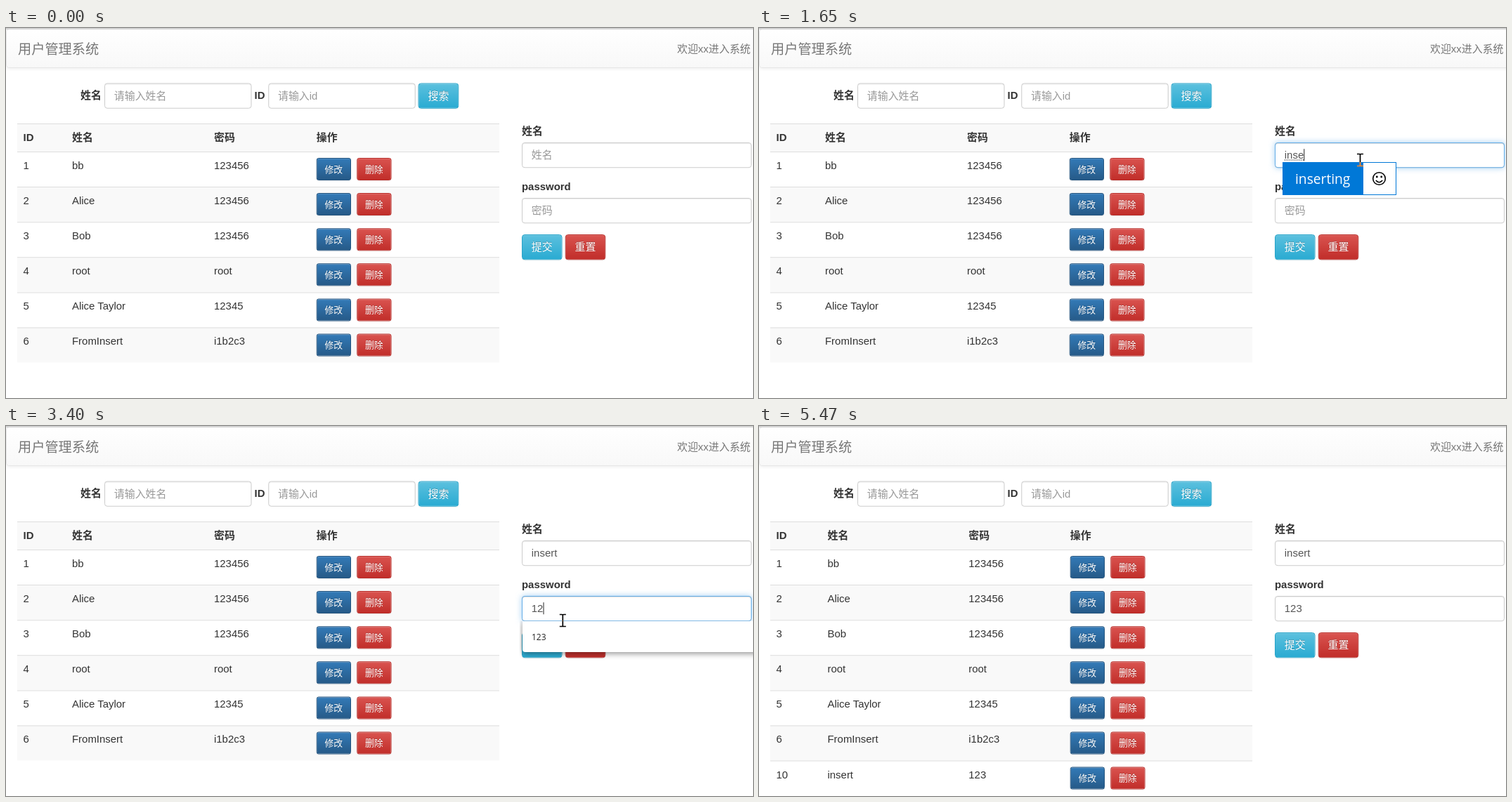
Animation, 1063 px wide and 527 px high, one loop 5560 ms. Source, as an HTML page:

```html
<!DOCTYPE html>
<html lang="zh">
<head>
<meta charset="utf-8">
<style>
html, body { margin: 0; width: 100%; height: 100%; overflow: hidden; background: #fff; }
/* zoom and scale cancel out: edges may lie between whole pixels */
#stage { position: absolute; left: 0; top: 0; width: 1063px; height: 527px; zoom: 4; transform: scale(.25); transform-origin: 0 0;
  overflow: hidden; background: #fff;
  font: 14.93px/0 "Liberation Sans", Arial, "Noto Sans CJK SC", "Noto Sans CJK", sans-serif; color: #333; }
#stage div { position: absolute; box-sizing: border-box; white-space: pre; }
#stage .b { font-weight: bold; }
.nav { border: 1px solid #e7e7e7; border-radius: 4px; background: linear-gradient(#fff, #f8f8f8);
  box-shadow: inset 0 1px 0 rgba(255,255,255,.15), 0 1px 5px rgba(0,0,0,.075); }
.line { background: #ddd; }
.stripe { background: #f9f9f9; }
.input { border: 1px solid #ccc; border-radius: 4px; background: #fff; box-shadow: inset 0 1px 1px rgba(0,0,0,.075); }
.glow { border: 1px solid #66afe9; border-radius: 4px; box-shadow: inset 0 1px 1px rgba(0,0,0,.075), 0 0 8px rgba(102,175,233,.6); }
.hint { color: #999; }
.val { color: #555; }
.btn { border: 1px solid; border-radius: 4px; color: #fff; text-align: center; text-shadow: 0 -1px 0 rgba(0,0,0,.2);
  box-shadow: inset 0 1px 0 rgba(255,255,255,.15), 0 1px 1px rgba(0,0,0,.075); }
.sm { border-radius: 3px; font-size: 12.8px; }
.info { background: linear-gradient(#5bc0de, #2aabd2); border-color: #28a4c9; }
.danger { background: linear-gradient(#d9534f, #c12e2a); border-color: #b92c28; }
.primary { background: linear-gradient(#337ab7, #265a88); border-color: #245580; }
.focus .info.submit { background: linear-gradient(#47b7d8, #2aabd2 58%); }
.focus .submit::after { content: ""; position: absolute; inset: 1px; border: 1.5px solid #101010; border-radius: 3px;
  box-shadow: 0 0 0 1px rgba(255,255,255,.6); }
.wide .c1 { margin-left: 3.5px; }
.wide .c2 { margin-left: 2.3px; }
.wide .c3 { margin-left: 1px; }
#stage:not(.wide) .new { display: none; }
.menu { background: #fff; border-radius: 0 0 4px 4px; box-shadow: 0 2px 8px rgba(0,0,0,.45); clip-path: inset(0 -20px -20px -4px); }
.item { font: 12px/0 "Open Sans", "Noto Sans", sans-serif; color: #222; }
.ime { background: #0078d7; color: #fff; font: 19.2px/0 "Open Sans", "Noto Sans", sans-serif; }
.emoji { background: #fff; border: 1px solid #0078d7; }
.comp { text-decoration: underline dotted #333 1.5px; text-underline-offset: 1px; text-decoration-skip-ink: none; }
.caret { position: absolute; top: -9px; width: 1px; height: 17px; background: #222; }
.ring { border-radius: 50%; background: rgba(255,250,0,.55); }
#stage svg { position: absolute; overflow: visible; left: 0; top: 0; }
#beam { mix-blend-mode: difference; }
</style>
</head>
<body>
<div id="stage"></div>
<script>
const stage = document.getElementById('stage');

function add(cls, x, y, w, h, html = '', parent = stage) {
  const d = document.createElement('div');
  d.className = cls;
  d.style.cssText = `left:${x}px;top:${y}px;` + (w ? `width:${w}px;height:${h}px;` : '');
  d.innerHTML = html;
  parent.append(d);
  return d;
}
// y is the middle of the text line
const text = (x, y, s, cls = '') => add(cls, x, y + .3, 0, 0, s);
function button(x, y, w, h, label, cls) {
  const b = add('btn ' + cls, x, y, w, h);
  add('', 0, h / 2 - .8, w - 2, 1, label, b);
}

// header bar and search form
add('', 0, 0, 1063, 2).style.background = '#d4d4d4';
add('nav', 0, 1.5, 1080, 55.5);
text(17, 29.5, '用户管理系统').style.cssText += 'font-size:19.2px;color:#777';
text(955, 29.5, '欢迎xx进入系统').style.color = '#777';
text(106, 95.5, '姓名', 'b');
add('input', 140, 78.5, 209.5, 36.2);
text(153.8, 97, '请输入姓名', 'hint');
text(353.5, 95.5, 'ID', 'b');
add('input', 373.3, 78.5, 209.5, 36.2);
text(387, 97, '请输入id', 'hint');
button(586.6, 78.5, 57.6, 36.2, '搜索', 'info');

// table
const cols = [24.5, 94, 296, 441.8];
add('stripe', 16, 136, 686, 40);
add('line', 16, 136, 686, 1);
['ID', '姓名', '密码', '操作'].forEach((s, i) => text(cols[i], 156, s, 'b c' + i));
const users = [
  ['1', 'bb', '123456'], ['2', 'Alice', '123456'], ['3', 'Bob', '123456'], ['4', 'root', 'root'],
  ['5', 'Alice Taylor', '12345'], ['6', 'FromInsert', 'i1b2c3'], ['10', 'insert', '123']
];
users.forEach((u, i) => {
  const y = 176 + 50.1 * i, extra = i == 6 ? ' new' : '';
  if (i % 2) add('stripe', 16, y, 686, 50);
  add('line' + extra, 16, y, 686, 1);
  u.forEach((s, k) => text(cols[k], y + 19.5, s, 'c' + k + extra));
  button(cols[3], y + 9, 49.1, 32, '修改', 'sm primary c3' + extra);
  button(cols[3] + 57.5, y + 9, 49.1, 32, '删除', 'sm danger c3' + extra);
});

// side form
function field(y, label, hint) {
  text(734, y - 16.5, label, 'b');
  add('input', 734, y, 327, 36.2);
  const glow = add('glow', 734, y, 327, 36.2);
  const body = text(747.8, y + 18, '');
  let last;
  return (val, caret, comp, lit) => {
    glow.style.opacity = lit;
    const bar = caret ? '<i class="caret"></i>' : '';
    const html = val ? `<span class="val${comp ? ' comp' : ''}">${val}</span>${bar}` : `${bar}<span class="hint">${hint}</span>`;
    if (html !== last) body.innerHTML = last = html;
  };
}
const setName = field(163, '姓名', '姓名');
const setPass = field(242, 'password', '密码');
button(734, 294, 57.6, 36.2, '提交', 'info submit');
button(795.7, 294, 57.6, 36.2, '重置', 'danger');

function menu(y, h, items) {
  const m = add('menu', 735, y, 345, h);
  items.forEach((s, i) => add('item', 13, 22.7 + 36.2 * i, 0, 0, s, m));
  return m;
}
const popups = {
  names: menu(199, 117, ['testName', 'FromInsert', 'FromInsert2']),
  pass2: menu(278, 80, ['123', '111']),
  pass1: menu(278, 44, ['123']),
  ime: add('', 745, 191, 162, 47)
};
add('ime', 0, 0, 114, 47, '', popups.ime);
add('ime', 18, 24, 0, 0, 'inserting', popups.ime);
add('emoji', 114, 0, 48, 47, `<svg width="46" height="45" fill="none" stroke="#000" stroke-width="1.6">
  <circle cx="22.5" cy="22.5" r="8.8"/><path d="M17.8 25Q22.5 30.5 27.2 25"/>
  <g fill="#000" stroke="none"><circle cx="19.3" cy="20" r="1.4"/><circle cx="25.7" cy="20" r="1.4"/></g></svg>`, popups.ime);

// pointers
const pointer = add('', 0, 0);
const ring = add('ring', -13, -13, 26, 26, '', pointer);
const shape = d => `<svg width="20" height="26"><path d="${d}" fill="#fff" stroke="#222" stroke-width="1.1" stroke-linejoin="round"/></svg>`;
const kinds = {
  arrow: add('', 0, 0, 0, 0, shape('M.5 .5V17.5L4.4 13.8L7 20L9.6 18.9L7 12.8H12.4Z'), pointer),
  hand: add('', 0, 0, 0, 0, shape('M-1.5 1Q0-1 1.5 1V9Q3 7.5 4.6 9.4Q6.2 8.4 7.6 10.2Q9.6 9.4 10.4 11.5V16Q10 19 8.6 20V22.5H-.5V20.5L-5 14.5Q-5.6 11.6-3 12.6L-1.5 14Z'), pointer),
  beam: add('', 0, 0, 0, 0, `<svg width="10" height="18"><path d="M-4.5-8.5H-1Q0-8.5 0-7.5Q0-8.5 1-8.5H4.5M0-8V8M-4.5 8.5H-1Q0 8.5 0 7.5Q0 8.5 1 8.5H4.5" fill="none" stroke="#fff" stroke-width="1.7"/></svg>`)
};
kinds.beam.id = 'beam';

// start, end, number of steps, from, to
const moves = [
  [70, 390, 6, 905, 168, 855.5, 188],
  [2600, 2830, 4, 846, 202, 781, 279],
  [2920, 3140, 4, 783, 279, 792.3, 277],
  [3530, 3680, 3, 788, 288, 771, 312],
  [3850, 4010, 3, 778, 318, 798, 334],
  [4230, 4380, 3, 835, 372, 984, 506]
];
function pointerAt(t) {
  const m = moves.filter(v => v[0] <= t).pop() || moves[0];
  const [a, b, n, x0, y0, x1, y1] = m;
  const k = Math.min(1, Math.max(0, Math.floor((t - a + 6) / (b - a) * (n - 1)) / (n - 1)));
  return [x0 + (x1 - x0) * k, y0 + (y1 - y0) * k];
}

const cues = [
  [0, { cur: '', click: 0, name: '', pass: '', caret: 0, comp: 0, pop: '', wide: 0, focus: 0 }],
  [70, { cur: 'beam' }],
  [560, { caret: 1, click: 1 }],
  [650, { click: 0, pop: 'names', cur: 'arrow' }],
  [1060, { caret: 0 }],
  [1280, { caret: 1, name: 'i' }],
  [1350, { comp: 1 }],
  [1430, { name: 'in', pop: '', cur: 'beam' }],
  [1500, { pop: 'ime' }],
  [1580, { name: 'ins' }],
  [1650, { name: 'inse' }],
  [1920, { name: 'inser' }],
  [2130, { name: 'insert' }],
  [2200, { pop: '' }],
  [2280, { comp: 0 }],
  [2750, { caret: 0, cur: 'arrow' }],
  [2830, { click: 1 }],
  [2920, { click: 0, caret: 2 }],
  [2990, { cur: 'beam' }],
  [3230, { pass: '1', pop: 'pass2' }],
  [3300, { pass: '12', pop: 'pass1' }],
  [3450, { pass: '123', pop: '' }],
  [3530, { cur: 'arrow' }],
  [3680, { cur: 'hand', click: 1, caret: 0 }],
  [3760, { click: 0, focus: 1 }],
  [3930, { wide: 1, cur: 'arrow' }],
  [4460, { cur: '' }],
  [5470, { focus: 0 }]
];

const ramp = (t, a) => Math.min(1, Math.max(0, (t - a) / 150));
const lit = (t, on, off) => ramp(t, on) - ramp(t, off);
const show = (e, on) => { e.style.display = on ? '' : 'none'; };

function draw(now) {
  const t = now % 5560, s = {};
  for (const [at, patch] of cues) if (at <= t) Object.assign(s, patch);
  stage.classList.toggle('wide', !!s.wide);
  stage.classList.toggle('focus', !!s.focus);
  setName(s.name, s.caret == 1, s.comp, lit(t, 520, 2900));
  setPass(s.pass, s.caret == 2, 0, lit(t, 2880, 3645));
  for (const k in popups) show(popups[k], k == s.pop);
  for (const k in kinds) show(kinds[k], k == s.cur);
  show(ring, s.click);
  const [x, y] = pointerAt(t);
  pointer.style.transform = kinds.beam.style.transform = `translate(${x}px,${y}px)`;
  requestAnimationFrame(() => draw(performance.now() - start));
}
const start = performance.now();
draw(0);
</script>
</body>
</html>
```
